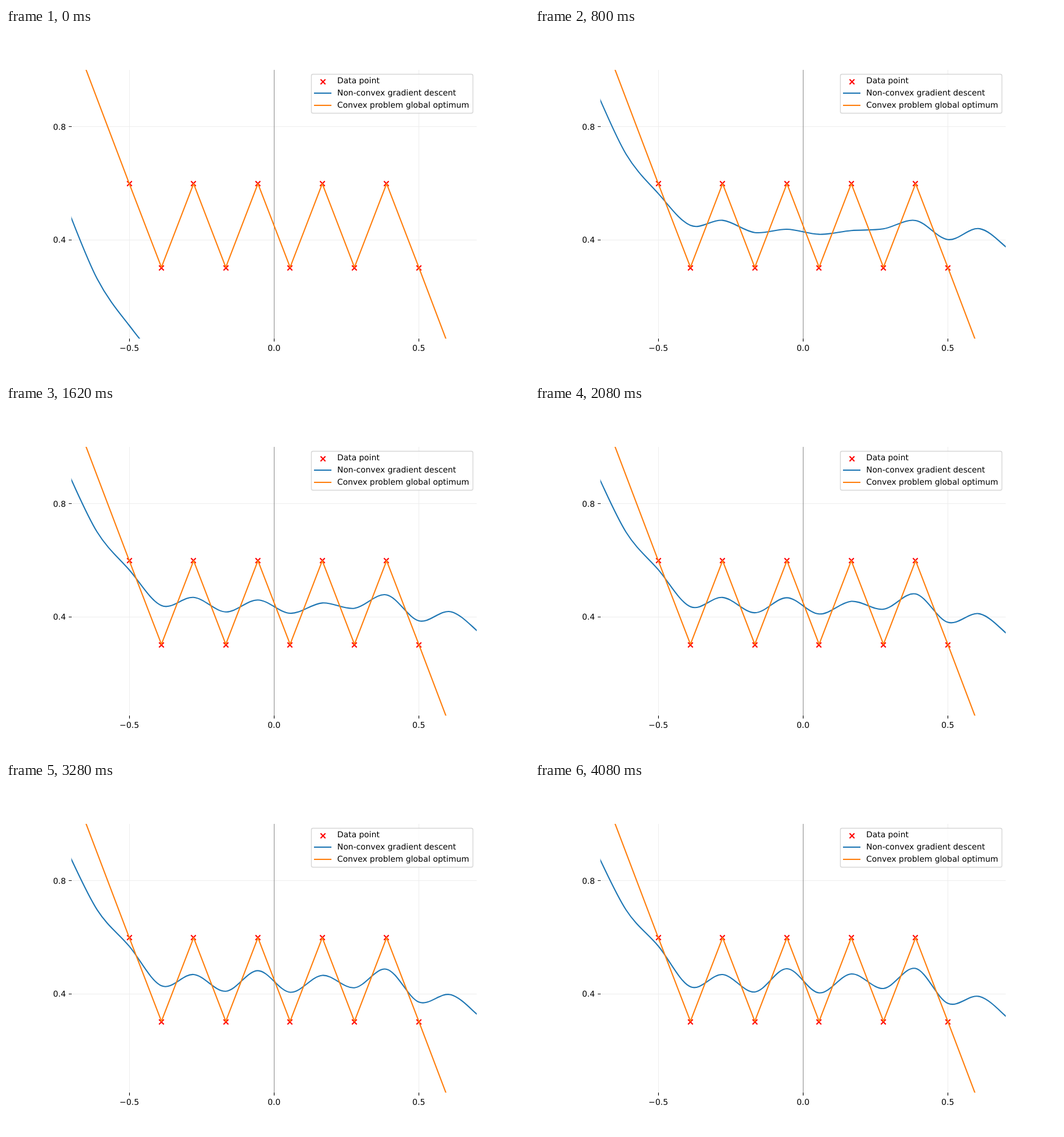
Recreate the animation shown at these times as an HTML page. Size 900 px wide and 600 px high, loop 4.1 s.

```html
<!DOCTYPE html>
<html>
<head>
<meta charset="utf-8">
<style>
  html, body { margin: 0; width: 100%; height: 100%; overflow: hidden; background: #fff; }
  svg { display: block; }
  text { font: 13.89px "DejaVu Sans", sans-serif; text-rendering: geometricPrecision; }
  .curve { fill: none; stroke-width: 2.08; stroke-linejoin: round; }
  .blue { stroke: #1f77b4; }
  .orange { stroke: #ff7f0e; }
  .cross { fill: none; stroke: #f00; stroke-width: 2.08; }
  .grid { stroke: #ededed; }
  .axis { stroke: #888; }
  .tick { stroke: #000; stroke-width: 1.1; }
</style>
</head>
<body>
<svg width="900" height="600" viewBox="0 0 900 600">
  <clipPath id="area"><rect x="112.5" y="72" width="697.5" height="462"/></clipPath>
  <path class="grid" d="M212.5 72V534M710.5 72V534M113 169.5H810M113 364.5H810"/>
  <path class="axis" d="M461.5 72V534"/>
  <path class="tick" d="M212.5 534v5M461.5 534v5M710.5 534v5M113 169.5h-5M113 364.5h-5"/>
  <g text-anchor="middle">
    <text x="212.2" y="555">−0.5</text>
    <text x="461.3" y="555">0.0</text>
    <text x="710.4" y="555">0.5</text>
  </g>
  <g text-anchor="end">
    <text x="103" y="175">0.8</text>
    <text x="103" y="369">0.4</text>
  </g>
  <g clip-path="url(#area)">
    <path id="points" class="cross"/>
    <path id="descent" class="curve blue"/>
    <polyline id="optimum" class="curve orange"/>
  </g>
  <rect x="525.5" y="79.5" width="278" height="67" rx="2.8" fill="#fff" fill-opacity=".8" stroke="#ccc" stroke-opacity=".8" stroke-width="1.39"/>
  <path id="key" class="cross"/>
  <path class="curve blue" d="M530 112H560"/>
  <path class="curve orange" d="M530 133H560"/>
  <text x="570" y="95">Data point</text>
  <text x="570" y="116">Non-convex gradient descent</text>
  <text x="570" y="137">Convex problem global optimum</text>
</svg>
<script>
const LOOP = 4100, STEP = 20, GAP = 55.357;
const $ = id => document.getElementById(id);
const dataX = i => 212.14 + i * GAP;
const cross = (x, y) => `M${x - 4.17} ${y - 4.17}l8.34 8.34m0 -8.34l-8.34 8.34`;

// Ten data points alternate between two heights; the optimum zigzags through them.
const index = [...Array(10).keys()];
$("points").setAttribute("d", index.map(i => cross(Math.floor(dataX(i)) + 0.5, i % 2 ? 412.5 : 267.5)).join(""));
$("key").setAttribute("d", cross(545.5, 92.5));
const slope = 145.8;
$("optimum").setAttribute("points", [
  [dataX(-2), 267.6 - 2 * slope],
  ...index.map(i => [dataX(i), i % 2 ? 411.4 : 267.6]),
  [dataX(10), 411.4 + slope]
].join(" "));

// Heights of the fitted curve at the data points and two more on either side.
const early = [96, 216, 285.5, 335, 330.5, 348.5, 354.5, 352, 354.5, 342, 334.5, 358, 337, 376];
const late = [112, 220, 282, 352, 331, 361, 321, 362.5, 330, 355, 320.5, 380.5, 369, 412];

// Slow drift is linear in log time; the initial offset dies out exponentially.
function fit(t) {
  const drift = Math.log(Math.max(t, 40) / 460) / Math.log(4080 / 460);
  const fade = Math.exp(-t / 15);
  return early.map((y, i) => {
    const start = y + 204 + 11 * i;
    const settled = y + (late[i] - y) * drift;
    return settled + (start - settled) * fade;
  });
}

// Smooth path through evenly spaced heights, with straight continuation at both ends.
function smooth(ys) {
  const n = ys.length - 1;
  const at = i => i < 0 ? 2 * ys[0] - ys[1] : i > n ? 2 * ys[n] - ys[n - 1] : ys[i];
  const handle = (i, side) => `${dataX(i - 2 + side / 3)} ${at(i) + side * (at(i + 1) - at(i - 1)) / 6}`;
  return ys.map((y, i) => (i ? `C${handle(i - 1, 1)} ${handle(i, -1)} ` : "M") + `${dataX(i - 2)} ${y}`).join("");
}

function draw() {
  const t = Math.floor(performance.now() % LOOP / STEP) * STEP;
  $("descent").setAttribute("d", smooth(fit(t)));
  requestAnimationFrame(draw);
}
draw();
</script>
</body>
</html>
```
